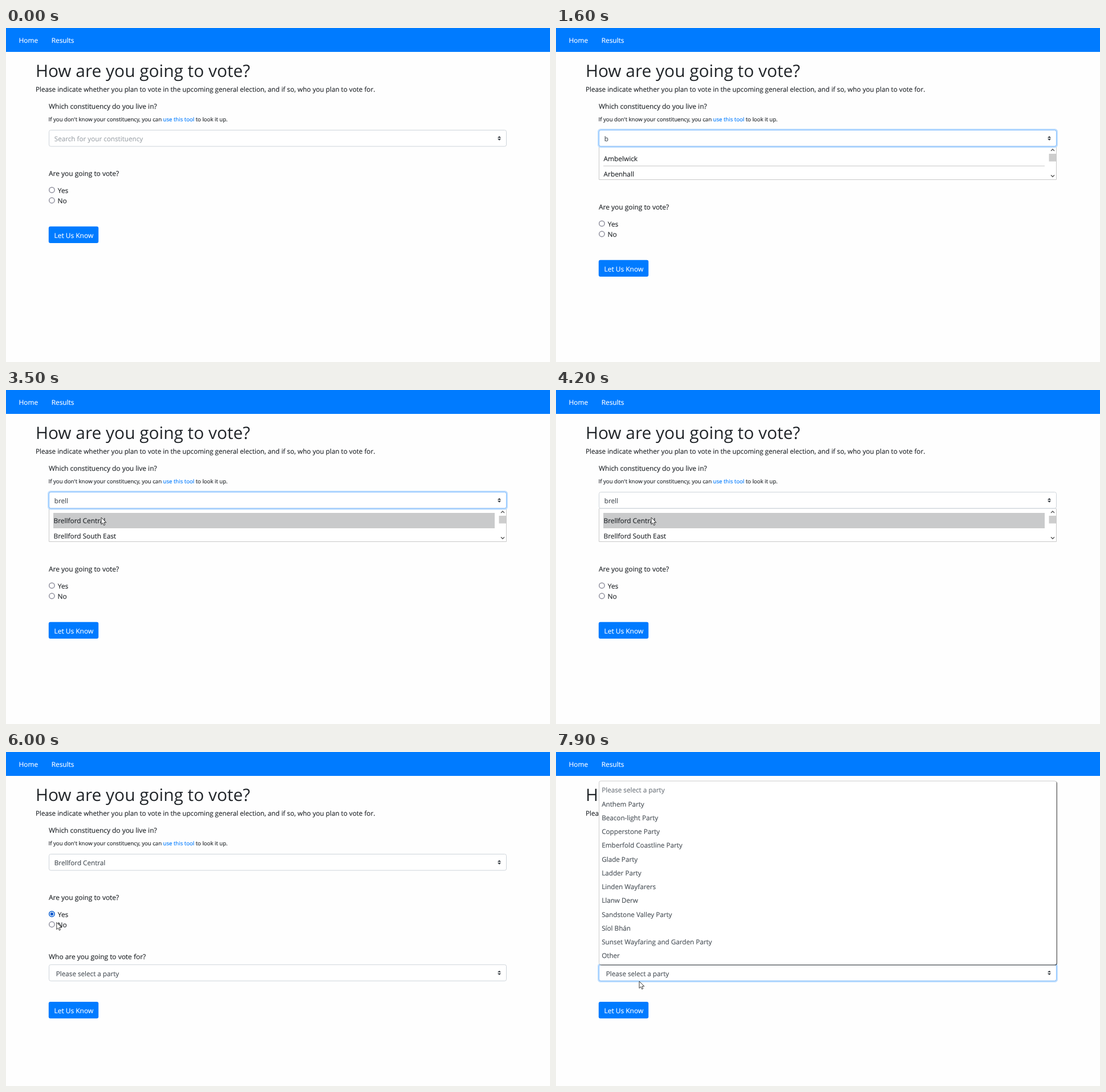
Write an HTML page that moves like this. It is 954x587 px and loops after 8 s.

```html
<!DOCTYPE html>
<html lang="en">
<head>
<meta charset="utf-8">
<title>How are you going to vote?</title>
<style>
html, body { margin: 0; width: 100%; height: 100%; overflow: hidden; background: #fefefe; }
svg { display: block; }
text, tspan { fill: var(--ink); stroke: var(--ink); }
text { --ink: #212529; font: 11.95px "Open Sans", "Noto Sans", sans-serif; stroke-width: .15px; text-rendering: geometricPrecision; white-space: pre; }
.title { font-size: 29.87px; stroke: none; }
.intro, .field, .option { font-size: 11.68px; }
.small { font-size: 9.62px; }
.row, .nav { font-size: 11.85px; }
.field, .option { --ink: #495057; }
.hint { --ink: #9ea4aa; }
.muted { --ink: #6f767d; }
.light { --ink: #fff; }
.link { --ink: #007bff; }
.radio { fill: #fff; stroke: #8f8f9d; stroke-width: 1.5; }
.popup { filter: drop-shadow(1px 1px .7px rgba(0, 0, 0, .65)); }
</style>
</head>
<body>
<svg width="954" height="587" viewBox="0 0 954 587">
  <defs>
    <g id="control">
      <rect x="75.5" y="179.5" width="802" height="28.5" rx="3" fill="#fff" stroke="#ced4da"/>
      <path d="M2 0L0 2h4zm0 5L0 3h4z" transform="translate(862 190) scale(1.526)" fill="#343a40"/>
    </g>
    <g id="ring" fill="none">
      <rect x="74.2" y="178.2" width="804.6" height="31" rx="4" stroke="#bfdeff" stroke-width="2.5"/>
      <rect x="75.5" y="179.5" width="802" height="28.5" rx="3" stroke="#80bdff"/>
    </g>
  </defs>

  <rect width="954" height="42" fill="#007bff"/>
  <text class="nav light" x="22.5" y="26">Home</text>
  <text class="nav light" x="79.7" y="26">Results</text>

  <text class="title" x="51.9" y="85.5">How are you going to vote?</text>
  <text class="intro" x="52" y="111.5">Please indicate whether you plan to vote in the upcoming general election, and if so, who you plan to vote for.</text>
  <text x="75" y="142.4">Which constituency do you live in?</text>
  <text class="small" x="74.6" y="164">If you don't know your constituency, you can <tspan class="link">use this tool</tspan> to look it up.</text>

  <use href="#control"/>
  <text class="field" id="search" x="84.8" y="199"></text>

  <g id="list">
    <path d="M75.5 208.5V266.5H877.5V208.5" fill="#fff" stroke="#c8c8c8"/>
    <path d="M75.5 208.2H877.5" stroke="#ced4da"/>
    <path d="M83 242.5H857" stroke="#c9c9c9"/>
    <rect id="hover" x="83" y="216" width="774" height="26.7" fill="#c9cacb"/>
    <text class="row" x="83.6" y="234.1"></text>
    <text class="row" x="83.6" y="260.8"></text>
    <rect x="864.5" y="221" width="13" height="13.5" fill="#cdcdcd"/>
    <path d="M868 216l3-3 3 3M868 258.5l3 3 3-3" fill="none" stroke="#555" stroke-width="1.4"/>
  </g>
  <use href="#ring" id="searchRing"/>

  <g id="lower">
    <text x="75" y="259.5">Are you going to vote?</text>
    <circle class="radio" id="yes" cx="80.4" cy="284.7" r="4.7"/>
    <circle id="dot" cx="80.4" cy="284.7" r="2.7" fill="#0058cf"/>
    <text x="90.8" y="290">Yes</text>
    <circle class="radio" cx="80.4" cy="303" r="4.7"/>
    <text x="90.6" y="308.3">No</text>
  </g>

  <g id="party">
    <text x="75" y="363.6">Who are you going to vote for?</text>
    <use href="#control" y="194.3"/>
    <use href="#ring" id="partyRing" y="194.3"/>
    <text class="field" x="87.8" y="393.5">Please select a party</text>
  </g>

  <g id="button">
    <rect x="74.8" y="348.8" width="87.4" height="29.2" rx="3" fill="#007bff"/>
    <text class="light" x="84.6" y="368.7">Let Us Know</text>
  </g>

  <g id="menu">
    <rect class="popup" x="75.5" y="51" width="802" height="322.5" rx="3" fill="#fff" stroke="#ccc"/>
  </g>

  <path id="cursor" d="M0 0V12.2L2.8 9.6 4.7 13.8 6.7 12.9 4.9 8.8H8.8Z" fill="#fff" stroke="#222" stroke-width=".9"/>
</svg>
<script>
const LOOP = 8000, STEP = 100;
const $ = id => document.getElementById(id);
const rows = document.querySelectorAll('.row');

const options = ['Please select a party', 'Anthem Party', 'Beacon-light Party', 'Copperstone Party',
  'Emberfold Coastline Party', 'Glade Party', 'Ladder Party', 'Linden Wayfarers', 'Llanw Derw',
  'Sandstone Valley Party', 'Síol Bhán', 'Sunset Wayfaring and Garden Party', 'Other'];
options.forEach((name, i) => {
  const item = document.createElementNS('http://www.w3.org/2000/svg', 'text');
  item.setAttribute('class', i ? 'option' : 'option muted');
  item.setAttribute('x', 80.2);
  item.setAttribute('y', 71.4 + i * 24.25);
  item.textContent = name;
  $('menu').append(item);
});

// time, field text, the two visible matches
const town = ['Brellford Central', 'Brellford South East'];
const typing = [
  [0, '', 'Addervon', 'Adderwyke'],
  [1600, 'b', 'Ambelwick', 'Arbenhall'],
  [1700, 'br', 'Ambrewick', 'Colbrenham'],
  [1900, 'bre', 'Ambrewick South', 'Brelland North'],
  [2100, 'brel', ...town],
  [2300, 'brell', ...town],
  [4400, town[0], ...town]
];

// time, x, y of the pointer tip
const path = [
  [3200, 166, 211], [3500, 167, 224], [4800, 167, 224], [5200, 81, 288], [5300, 81, 288],
  [5500, 80, 284], [5800, 80, 284], [6600, 136, 384], [6700, 136, 384], [6900, 141, 387],
  [7100, 141, 387], [7700, 138, 412], [7800, 138, 412], [7900, 146, 403], [LOOP, 146, 403]
];

const show = (id, on) => { $(id).style.display = on ? '' : 'none'; };
const move = (id, x, y) => $(id).setAttribute('transform', `translate(${x} ${y})`);
const fade = (id, value) => { $(id).style.opacity = value; };

function pointer(t) {
  const i = path.findIndex(p => p[0] > t);
  const a = path[Math.max(i - 1, 0)], b = path[i];
  const k = Math.max(0, (t - a[0]) / (b[0] - a[0] || 1));
  const e = k * k * (3 - 2 * k);
  return [a[1] + (b[1] - a[1]) * e, a[2] + (b[2] - a[2]) * e];
}

function render(t) {
  const within = (from, to = LOOP) => t >= from && t < to;
  const open = within(400, 4400), asked = within(5900), checked = within(5700);

  const [, value, ...matches] = typing.filter(s => s[0] <= t).pop();
  $('search').textContent = value || 'Search for your constituency';
  $('search').classList.toggle('hint', !value);
  rows.forEach((row, i) => { row.textContent = matches[i]; });

  show('list', open);
  show('hover', within(3300, 4400));
  fade('searchRing', within(500, 4200) ? 1 : within(400, 500) ? 0.5 : 0);

  move('lower', 0, open ? 59 : 0);
  move('button', 0, open ? 59 : asked ? 90.3 : 0);
  $('yes').style.stroke = checked ? '#0058cf' : within(5400) ? '#5b5b66' : '';
  show('dot', checked);

  show('party', asked);
  fade('partyRing', within(7300) ? 1 : within(7200) ? 0.5 : 0);
  show('menu', within(7300));

  show('cursor', within(3200));
  move('cursor', ...pointer(t));
}

const start = performance.now();
function tick() {
  const t = (performance.now() - start) % LOOP;
  render(Math.floor(t / STEP) * STEP);
  requestAnimationFrame(tick);
}
tick();
</script>
</body>
</html>
```
